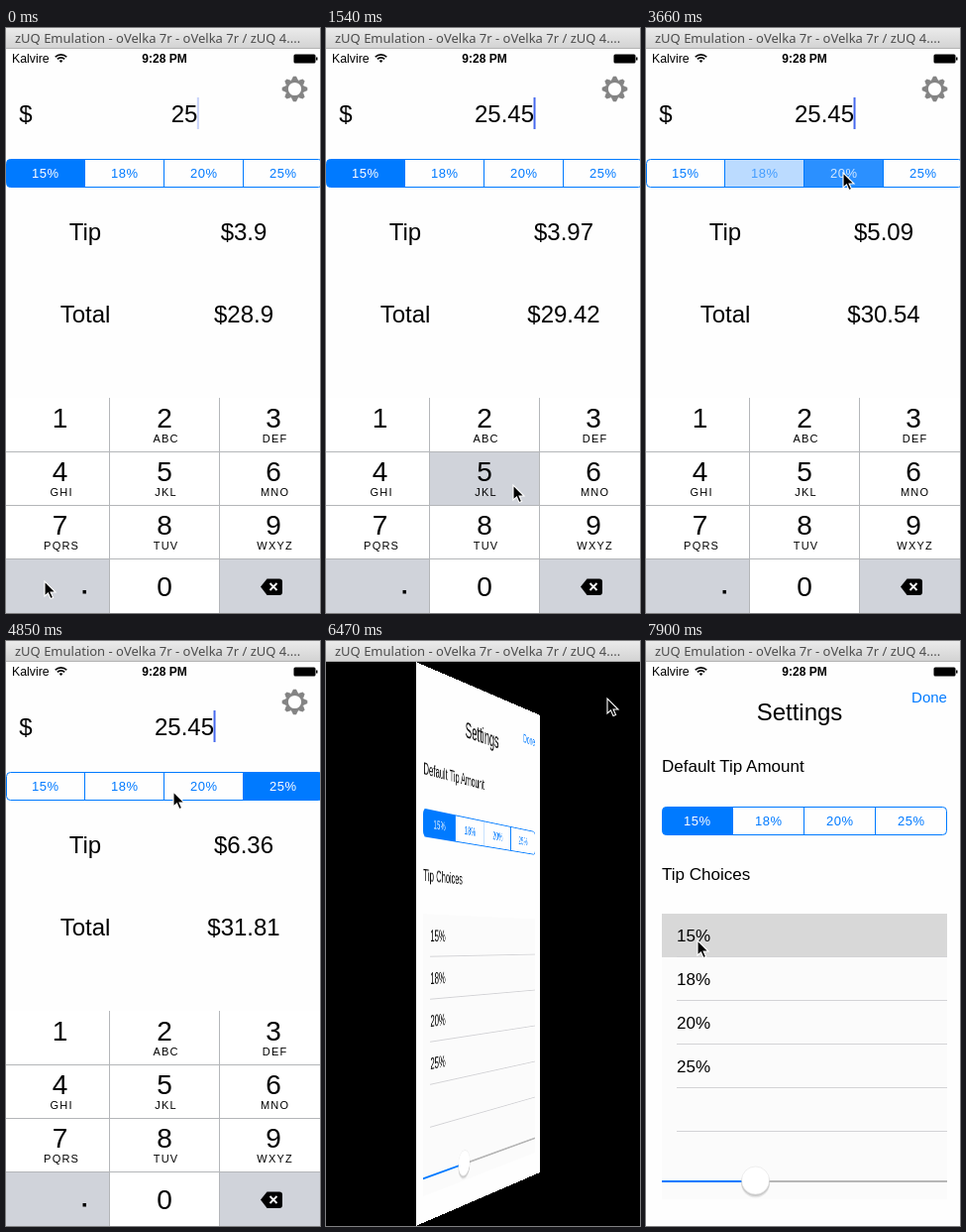
An HTML page that plays this animation: 317x590 px, repeating every 8000 ms.

```html
<!DOCTYPE html>
<html lang="en">
<head>
<meta charset="utf-8">
<title>Tip calculator</title>
<style>
  html, body { margin: 0; width: 100%; height: 100%; overflow: hidden; background: #fff; }
  #stage { position: relative; width: 317px; height: 590px; overflow: hidden; }
  #screen { position: absolute; left: 0; top: 21px; width: 320px; height: 569px; overflow: hidden;
            background: #000; perspective: 1230px; perspective-origin: 160px 284px; }
  svg { position: absolute; left: 0; top: 0; display: block; }
  .page { transform-origin: 160px 284px; background: #fefefe; }
  text { font-family: "Liberation Sans", Arial, sans-serif; text-anchor: middle; white-space: pre; }
  .left { text-anchor: start; }
  .spaced { letter-spacing: .5px; }
  .letters { letter-spacing: 1.2px; }
  .title { font-family: "Noto Sans", "Open Sans", sans-serif; text-anchor: start; }
</style>
</head>
<body>
<div id="stage">
  <div id="screen">
    <svg id="calculator" class="page" width="320" height="569" viewBox="0 21 320 569"></svg>
    <svg id="settings" class="page" width="320" height="569" viewBox="0 21 320 569"></svg>
  </div>
  <svg id="overlay" width="317" height="590"></svg>
</div>
<script>
const LOOP = 8000, BLUE = '#007aff';
const $ = id => document.getElementById(id);
const clamp = v => Math.min(1, Math.max(0, v));
const smooth = v => (v = clamp(v), v * v * (3 - 2 * v));
const range = (t, start, length) => clamp((t - start) / length);

const text = (x, y, size, label, attrs = '') =>
  `<text x="${x}" y="${y}" font-size="${size}" ${attrs}>${label}</text>`;
const rect = (x, y, w, h, fill, attrs = '') =>
  `<rect x="${x}" y="${y}" width="${w}" height="${h}" fill="${fill}" ${attrs}/>`;
const line = (x1, y1, x2, y2, stroke, attrs = '') =>
  `<path d="M${x1} ${y1}L${x2} ${y2}" stroke="${stroke}" fill="none" ${attrs}/>`;

const choices = ['15%', '18%', '20%', '25%'];

function segments(id, x, y, width) {
  const w = width / 4;
  const frame = `x="${x + .5}" y="${y + .5}" width="${width - 1}" height="28" rx="4"`;
  return `<clipPath id="${id}-clip"><rect ${frame}/></clipPath>
    <g id="${id}"><g clip-path="url(#${id}-clip)">` +
    choices.map((_, i) => rect(x + i * w, y, w, 29, BLUE)).join('') + '</g>' +
    choices.map((c, i) => text(x + (i + .5) * w - .3, y + 19, 13, c, 'class="spaced"')).join('') + '</g>' +
    [1, 2, 3].map(i => line(x + i * w - .5, y, x + i * w - .5, y + 28, BLUE)).join('') +
    `<rect ${frame} fill="none" stroke="${BLUE}"/>`;
}

// Weight 1 is a fully selected segment, 0 an idle one.
function select(id, weights) {
  const fills = document.querySelectorAll(`#${id} rect`);
  const labels = document.querySelectorAll(`#${id} text`);
  weights.forEach((s, i) => {
    fills[i].setAttribute('opacity', s);
    labels[i].setAttribute('fill', `rgb(${255 * s},${122 + 133 * s},255)`);
  });
}

function gear(x, y) {
  let teeth = '';
  for (let i = 0; i < 8; i++)
    teeth += `<path d="M-3.6 -8.4L-1.5 -12.8H1.5L3.6 -8.4Z" transform="rotate(${i * 45})"/>`;
  return `<g transform="translate(${x} ${y})" fill="#848484">${teeth}
    <circle r="7.9" fill="#fefefe" stroke="#848484" stroke-width="2.6"/></g>`;
}

$('calculator').innerHTML =
  text(20, 95, 24, '$') + text(180, 95, 24, '', 'id="bill"') +
  rect(0, 70, 2, 32, '#4669ee', 'id="caret"') + gear(291.5, 61.5) +
  segments('rates', 0, 132, 320) +
  text(80, 214, 24, 'Tip') + text(240, 214, 24, '', 'id="tip"') +
  text(80, 297, 24, 'Total') + text(240, 297, 24, '', 'id="total"');

$('settings').innerHTML =
  text(155, 80, 24, 'Settings') + text(286, 62, 15, 'Done', `fill="${BLUE}"`) +
  text(16, 132, 17, 'Default Tip Amount', 'class="left"') +
  segments('defaults', 16, 167, 288) +
  text(16, 241, 17, 'Tip Choices', 'class="left"') +
  rect(16, 275, 288, 288, '#fbfbfb') + rect(16, 275, 288, 44, '#d8d8d8', 'id="row"') +
  [0, 1, 2, 3, 4].map(i => line(31, 318.5 + 44 * i, 304, 318.5 + 44 * i, '#d3d3d6')).join('') +
  choices.map((c, i) => text(31, 303 + 44 * i, 17, c, 'class="left"')).join('') +
  `<g id="slider">${rect(16, 544, 288, 2, '#b6b6b6')}${rect(16, 544, 94, 2, BLUE)}
   <g><circle cy="547" r="14.5" fill="#000" opacity=".08"/><circle cy="545.5" r="14.5" fill="#000" opacity=".12"/>
   <circle cy="544" r="14" fill="#fff" stroke="#ddd" stroke-width=".5"/></g></g>`;

function keypad() {
  const letters = ['', 'ABC', 'DEF', 'GHI', 'JKL', 'MNO', 'PQRS', 'TUV', 'WXYZ'];
  const columns = [54.5, 160, 270];
  let out = rect(0, 373, 320, 217, '#fff') + rect(0, 535, 104, 55, '#d0d3da') + rect(216, 535, 104, 55, '#d0d3da') +
    rect(0, 428, 104, 53, '#d0d3da', 'id="key4"') + rect(105, 428, 110, 53, '#d0d3da', 'id="key5"');
  letters.forEach((label, i) => {
    const x = columns[i % 3], y = 403 + 54 * Math.floor(i / 3);
    out += text(x, y, 28, i + 1) + text(x + 1.6, y + 15, 11, label, 'class="letters"');
  });
  out += text(160, 573, 28, 0) + rect(77.5, 567, 3.5, 3.5, '#000');
  for (const y of [427.5, 481.5, 535.5]) out += line(0, y, 320, y, '#b4b6b9');
  for (const x of [104.5, 215.5]) out += line(x, 373, x, 590, '#b4b6b9');
  return out +
    '<path d="M257 563.5L263.5 555.5H276a3 3 0 0 1 3 3V569a3 3 0 0 1-3 3H263.5Z"/>' +
    '<path d="M266.5 560l7 7m0-7l-7 7" stroke="#fff" stroke-width="1.8"/>';
}

function statusBar() {
  const arc = r => `<path d="M${55.5 - r * .72} ${35 - r * .72}A${r} ${r} 0 0 1 ${55.5 + r * .72} ${35 - r * .72}"
    fill="none" stroke="#000" stroke-width="1.7"/>`;
  return text(6, 35, 12.3, 'Kalvire', 'class="left"') + arc(8) + arc(5) +
    '<path d="M55.5 35l-1.8-2a2.6 2.6 0 0 1 3.6 0Z"/>' +
    text(160, 35, 12, '9:28 PM', 'font-weight="bold"') +
    rect(290.5, 26.5, 22, 9, '#000', 'rx="1.5"') + rect(313, 29.5, 1.5, 3, '#000');
}

$('overlay').innerHTML = `
  <defs><linearGradient id="chrome" x2="0" y2="1">
    <stop stop-color="#ebebeb"/><stop offset="1" stop-color="#d2d2d2"/></linearGradient></defs>
  <g id="keypad">${keypad()}</g>${statusBar()}
  ${rect(0, 0, 317, 21, 'url(#chrome)')}${line(0, 20.5, 317, 20.5, '#b3b3b3')}
  ${text(9, 15, 13, 'zUQ Emulation - oVelka 7r - oVelka 7r / zUQ 4....', 'class="title" fill="#4c4c4c"')}
  <path id="pointer" d="M0 0V15L3.5 11.9L6 17.6L8.6 16.4L6.1 11H11Z" stroke="#fff" stroke-width="1.1"/>`;

select('defaults', [1, 0, 0, 0]);

// [time, bill, tip, total]
const amounts = [
  [0, '25', '3.9', '28.9'], [300, '25.', '3.9', '28.9'],
  [1080, '25.4', '3.96', '29.36'], [1500, '25.45', '3.97', '29.42'],
  [2620, '25.45', '4.75', '30.2'], [3480, '25.45', '5.09', '30.54'], [4310, '25.45', '6.36', '31.81'],
];
const rateTaps = [-1000, 2600, 3470, 4300];

// [time, x, y] of the pointer tip
const pointerPath = [
  [0, 39, 558], [420, 39, 558], [860, 46, 452], [1180, 46, 452], [1430, 189, 461], [1740, 189, 461],
  [1890, 132, 96], [2060, 132, 96], [2450, 133, 140], [2920, 133, 140], [3300, 199, 146], [3780, 199, 146],
  [4150, 275, 150], [4670, 275, 150], [4850, 169, 152], [5080, 107, 157], [5300, 107, 146],
  [5560, 300, 54], [5720, 284, 58], [6980, 284, 58], [7180, 66, 287], [7410, 66, 287], [7720, 52, 302], [8000, 52, 302],
];

function pointerAt(t) {
  const i = pointerPath.findIndex(p => p[0] > t);
  const [t0, x0, y0] = pointerPath[i - 1], [t1, x1, y1] = pointerPath[i];
  const k = smooth((t - t0) / (t1 - t0));
  return [x0 + (x1 - x0) * k, y0 + (y1 - y0) * k];
}

const blink = phase => phase < 440 ? 1 - range(phase, 0, 200) : range(phase, 440, 200);
function caretOpacity(t) {
  if (t < 300) return blink(t + 140);
  if (t < 2060) return 1;
  return t < 5900 ? blink((t - 2060) % 940) : 0;
}

const show = (id, visible) => { $(id).style.display = visible ? '' : 'none'; };

function flip(t) {
  const angle = 180 * smooth(range(t, 6140, 555));
  const depth = -160 * Math.sin(angle * Math.PI / 180);
  const front = angle < 90;
  show('calculator', front);
  show('settings', !front);
  $(front ? 'calculator' : 'settings').style.transform =
    angle % 180 ? `translateZ(${depth}px) rotateY(${front ? -angle : 180 - angle}deg)` : 'none';
}

function draw(t) {
  const [, bill, tip, total] = amounts.filter(a => a[0] <= t).pop();
  $('bill').textContent = bill;
  $('tip').textContent = '$' + tip;
  $('total').textContent = '$' + total;
  $('caret').setAttribute('x', 180 + $('bill').getComputedTextLength() / 2 - .5);
  $('caret').setAttribute('opacity', caretOpacity(t));

  select('rates', rateTaps.map((tap, i) =>
    range(t, tap, 230) - (i < 3 ? range(t, rateTaps[i + 1], 260) : 0)));

  show('key4', t >= 920 && t < 1120);
  show('key5', t >= 1420 && t < 1590);
  const slide = 1 - (1 - range(t, 5980, 440)) ** 3;
  $('keypad').setAttribute('transform', `translate(0 ${217 * slide})`);

  flip(t);
  show('row', t >= 7900);
  const thumb = t < 7900 ? 109 : 110.5;
  $('slider').children[1].setAttribute('width', thumb - 16);
  $('slider').children[2].setAttribute('transform', `translate(${thumb} 0)`);
  $('pointer').setAttribute('transform', `translate(${pointerAt(t)})`);
}

const began = performance.now();
function tick() {
  draw((performance.now() - began) % LOOP);
  requestAnimationFrame(tick);
}
tick();
</script>
</body>
</html>
```
